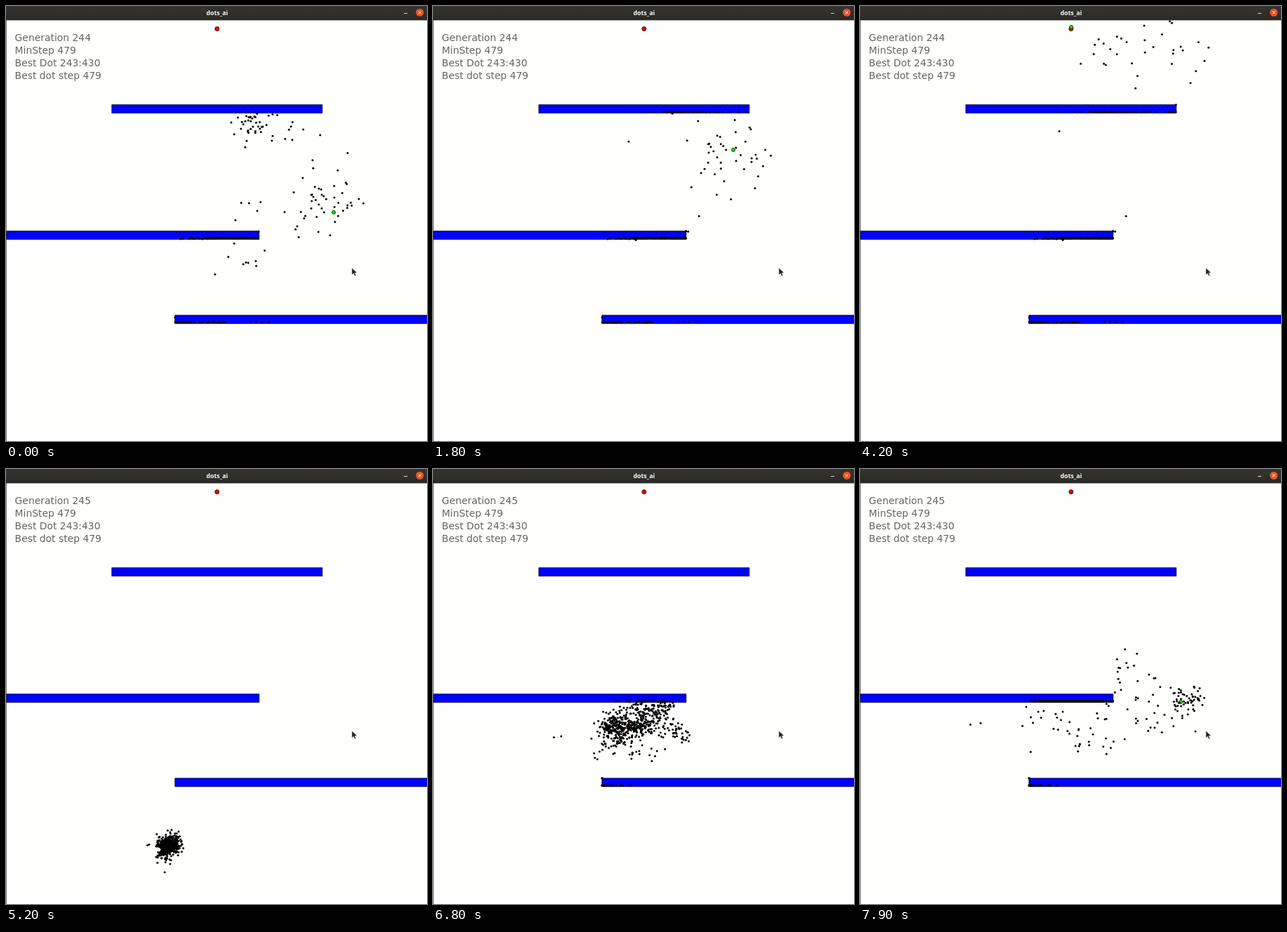
Write an HTML page with a canvas that moves like this. It is 600 px wide and 620 px high and loops after 8000 ms.

```html
<!DOCTYPE html>
<html lang="en">
<head>
<meta charset="utf-8">
<title>dots_ai</title>
<style>
  html, body { margin: 0; width: 100%; height: 100%; overflow: hidden; background: #fffffd; }
  canvas { display: block; }
</style>
</head>
<body>
<canvas id="stage" width="600" height="620"></canvas>
<script>
const LOOP = 8000, STEP = 100, RESTART = 4500, GOAL = 4200;
const TOP = 20.5, THICK = 12;
const BARS = [[150.8, 140.7, 300], [.8, 320.7, 360], [240.8, 440.7, 360]];
const ctx = document.getElementById('stage').getContext('2d');

let seed = 245;
function rand() {
  seed = (seed + 0x6D2B79F5) | 0;
  let r = Math.imul(seed ^ (seed >>> 15), 1 | seed);
  r = (r + Math.imul(r ^ (r >>> 7), 61 | r)) ^ r;
  return ((r ^ (r >>> 14)) >>> 0) / 4294967296;
}
const gauss = () => (rand() + rand() + rand() + rand() - 2) * 1.73;
const many = (n, make) => Array.from({ length: n }, make);

// Smooth curve through keys of the form [time, ...values]
function along(track, t) {
  const last = track.length - 1;
  t = Math.max(track[0][0], Math.min(track[last][0], t));
  let i = 0;
  while (i < last - 1 && track[i + 1][0] <= t) i++;
  const a = track[i], b = track[i + 1], h = b[0] - a[0], u = (t - a[0]) / h;
  const slope = (j, k) => {
    const p = track[Math.max(j - 1, 0)], q = track[Math.min(j + 1, last)];
    return (q[k] - p[k]) / (q[0] - p[0]) * h;
  };
  const s = u * u * (3 - 2 * u);
  return a.slice(1).map((v, n) => v + (b[n + 1] - v) * s +
    u * (1 - u) * ((1 - u) * slope(i, n + 1) - u * slope(i + 1, n + 1)));
}

// The y at which a dot sticks, if it touches the ceiling or a bar
function contact(x, y) {
  if (y < TOP) return TOP;
  const bar = BARS.find(([bx, by, w]) => x > bx && x < bx + w && y > by && y < by + THICK - 1);
  return bar && (y > bar[1] + THICK / 3 ? bar[1] + 10.2 : bar[1]);
}

function position(dot, t) {
  if (t >= dot.end) return dot.spot;
  const [x, y, sx, sy] = along(dot.track, t), dx = dot.u * sx;
  return [x + dx, y + dx * dot.tilt + dot.v * sy];
}

// A swarm follows a track of [time, x, y, spread x, spread y]; each dot flies until it hits something.
function swarm(n, track, tilt = 0) {
  return many(n, () => {
    const dot = { track, tilt, u: gauss(), v: gauss(), end: Infinity };
    for (let t = track[0][0]; t <= track[track.length - 1][0]; t += 20) {
      const [x, y] = position(dot, t), edge = contact(x, y);
      if (edge) {
        dot.spot = [x, edge];
        dot.end = t;
        break;
      }
    }
    return dot;
  });
}

// Dots that were stuck before the loop starts, densest at x0
const stuck = (n, x0, x1, y, power = 1) =>
  many(n, () => ({ end: 0, spot: [x0 + (x1 - x0) * rand() ** power, y + rand()] }));

// All dots start at one point and stay close until the first gap.
function fromStart(n, tilt, ...poses) {
  const [x, y, sx, sy] = poses[0];
  return swarm(n, [
    [RESTART, 300, 578, 2, 2],
    [5300, 224 + (x - 209) / 4, 525 + (y - 405) / 4, sx / 2, sy * .7],
    ...poses.map((p, i) => [[5900, 6800, 7900][i], ...p])
  ], tilt);
}

const runs = [{
  number: 244,
  best: [[0, 467, 294], [1000, 368, 272], [1800, 428, 205], [2700, 461, 121], [GOAL, 301, 30]],
  dots: [
    swarm(34, [[0, 350, 167, 12, 9], [1000, 352, 85, 28, 9]]),
    swarm(14, [[0, 380, 183, 28, 16], [1000, 372, 90, 30, 16]]),
    swarm(38, [[0, 454, 270, 25, 22], [1000, 358, 247, 27, 25], [1800, 415, 198, 30, 30],
      [2250, 458, 160, 28, 30], [2700, 482, 118, 20, 22], [3600, 428, 60, 45, 28], [GOAL, 375, 45, 55, 28]]),
    swarm(9, [[0, 445, 290, 32, 18], [1000, 372, 290, 45, 35], [1800, 435, 225, 32, 35],
      [2700, 505, 150, 26, 30], [GOAL, 430, 75, 55, 35]]),
    swarm(5, [[0, 350, 289, 14, 10], [1000, 290, 255, 28, 30], [1900, 330, 130, 28, 30]]),
    swarm(9, [[0, 338, 349, 22, 11], [1000, 340, 300, 28, 11]]),
    stuck(130, 360, 280, 330, 1.1),
    stuck(16, 290, 245, 331),
    stuck(48, 241, 312, 450, 1.5),
    stuck(4, 345, 390, 450),
    stuck(1, 241, 241, 443),
    stuck(1, 360, 360, 320.5)
  ].flat()
}, {
  number: 245,
  best: [[RESTART, 300, 578], [5300, 224, 525], [5900, 209, 405], [6800, 289, 368], [7900, 457, 332]],
  dots: [
    fromStart(150, 0, [209, 405, 8, 6], [257, 369, 9, 9], [285, 300, 16, 9]),
    fromStart(170, -.3, [211, 408, 19, 11], [294, 356, 25, 18], [320, 280, 25, 18]),
    fromStart(100, -.3, [239, 394, 10, 8], [321, 343, 16, 13], [335, 290, 16, 13]),
    fromStart(75, -.6, [172, 440, 10, 10], [270, 372, 22, 16], [295, 285, 25, 16]),
    fromStart(55, 0, [205, 405, 8, 6], [289, 368, 9, 7], [466, 330, 11, 12]),
    fromStart(28, 0, [193, 388, 7, 4], [354, 376, 9, 9], [392, 300, 28, 28]),
    fromStart(48, 0, [194, 430, 19, 20], [288, 388, 36, 16], [318, 371, 50, 20]),
    fromStart(14, 0, [200, 420, 10, 8], [325, 370, 14, 9], [425, 350, 24, 18]),
    fromStart(18, 0, [262, 435, 9, 6], [258, 350, 9, 6])
  ].flat()
}];

function trace(points, close) {
  ctx.beginPath();
  for (const [x, y] of points) ctx.lineTo(x, y);
  if (close) ctx.closePath();
}
function stroke(color, width) {
  ctx.strokeStyle = color;
  ctx.lineWidth = width;
  ctx.stroke();
}
function disc(x, y, r, fill, edge) {
  ctx.beginPath();
  ctx.arc(x, y, r, 0, 7);
  ctx.fillStyle = fill;
  ctx.fill();
  if (edge) stroke(edge, .8);
}
function rect(x, y, w, h, fill) {
  ctx.fillStyle = fill;
  ctx.fillRect(x, y, w, h);
}
function bar([x, y, w]) {
  ctx.beginPath();
  ctx.rect(x, y, w, THICK);
  ctx.fillStyle = '#0000ff';
  ctx.fill();
  stroke('#000', .75);
}

function titleBar() {
  const shade = ctx.createLinearGradient(0, 0, 0, 20);
  shade.addColorStop(0, '#353431');
  shade.addColorStop(1, '#2b2a27');
  rect(0, 0, 600, 20.4, shade);
  ctx.fillStyle = '#fff';
  ctx.textAlign = 'center';
  ctx.font = 'bold 8.8px "Noto Sans", "Open Sans", sans-serif';
  ctx.fillText('dots_ai', 300.8, 12.5);
  rect(567, 10, 5, 1, '#d8d6d2');
  disc(589.7, 9.3, 5.6, '#e95420');
  for (const s of [-2, 2]) {
    trace([[589.7 - s, 7.3], [589.7 + s, 11.3]]);
    stroke('#fff', 1);
  }
}

function pointer() {
  trace([[493, 373.5], [493, 383], [495.3, 381], [497, 384.5], [498.6, 383.8], [497, 380.4], [500, 380]], true);
  ctx.fillStyle = '#222';
  ctx.fill();
  stroke('#bbb', .5);
}

function draw(t) {
  const run = runs[t < RESTART ? 0 : 1];
  rect(0, 0, 600, 620, '#fffffd');
  rect(0, 20, 1, 600, '#777');
  titleBar();
  ctx.textAlign = 'left';
  ctx.fillStyle = '#646464';
  ctx.font = '13.9px "DejaVu Sans", sans-serif';
  [`Generation ${run.number}`, 'MinStep 479', 'Best Dot 243:430', 'Best dot step 479']
    .forEach((line, i) => ctx.fillText(line, 12.6, 50.2 + 18 * i));
  BARS.forEach(bar);
  disc(300.8, 32.6, 3, '#f00', '#000');
  disc(...along(run.best, t), 2.5, '#0f0', '#000');
  for (const dot of run.dots) disc(...position(dot, t), 1.5, '#000');
  pointer();
}

let shown = -1;
function tick(now) {
  const t = Math.floor(now % LOOP / STEP) * STEP;
  if (t !== shown) draw(shown = t);
  requestAnimationFrame(tick);
}
draw(0);
requestAnimationFrame(tick);
</script>
</body>
</html>
```
